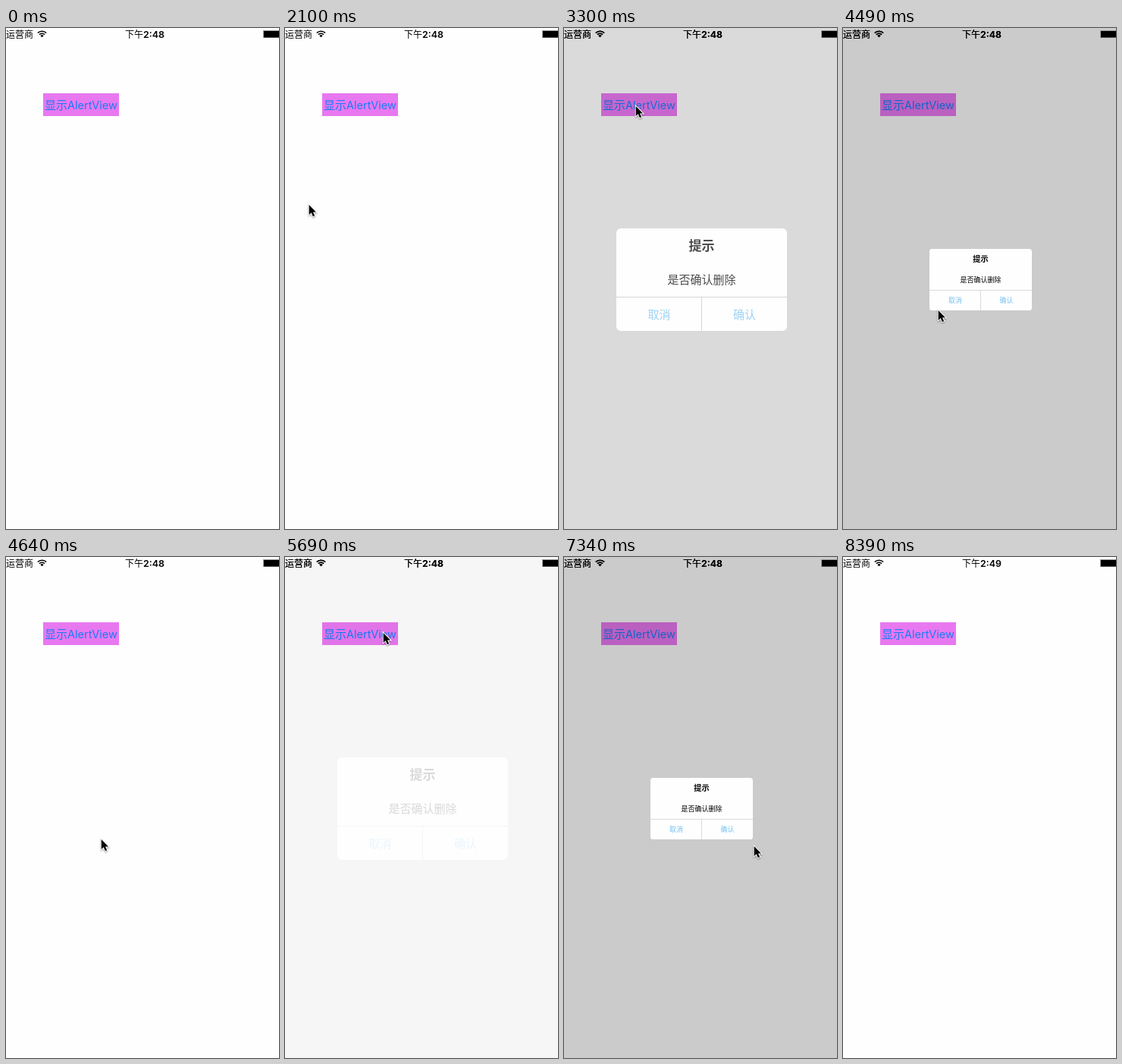
An HTML page with a canvas for the animation above (9.04 s loop, 360 by 660 pixels).

```html
<!DOCTYPE html>
<html lang="zh-CN">
<head>
<meta charset="utf-8">
<style>
html, body { margin: 0; width: 100%; height: 100%; overflow: hidden; background: #fefefe; }
canvas { display: block; width: 360px; height: 660px; }
</style>
</head>
<body>
<canvas id="stage"></canvas>
<script>
const W = 360, H = 660, LOOP = 9040, STEP = 150;
const CJK = '"Noto Sans CJK SC", "Noto Sans CJK", sans-serif';
const LATIN = 'Inter, sans-serif';
const canvas = document.getElementById('stage');
const c = canvas.getContext('2d');
const dpr = window.devicePixelRatio || 1;
canvas.width = W * dpr;
canvas.height = H * dpr;

const clamp = v => Math.max(0, Math.min(1, v));
const ease = v => { v = clamp(v); return v * v * (3 - 2 * v); };

// Pointer stops: time, x, y, sideways bend on the way there
const stops = [
  [2100, 31, 232], [2550, 89, 107], [2700, 89, 107], [2850, 94, 102],
  [3300, 94, 102], [4040, 125, 371], [4790, 125, 371], [5390, 129, 99, -7],
  [5840, 129, 99], [6590, 242, 393], [6890, 250, 380], [7640, 250, 380],
  [8240, 345, 645], [8390, 345, 645]
];

// Each showing: fade-in start, shrink start, removal
const alerts = [
  { open: 3108, shrink: 4250, end: 4640 },
  { open: 5617, shrink: 7100, end: 7490 }
];

function snap(t) {
  const shift = t < 3440 ? 0 : 10;
  return Math.floor((t + shift) / STEP) * STEP - shift;
}

function text(str, x, y, size, color, { font = CJK, weight = 400, align = 'left' } = {}) {
  c.font = `${weight} ${size}px ${font}`;
  c.textAlign = align;
  c.fillStyle = color;
  c.fillText(str, x, y);
}

function rect(x, y, w, h, color) {
  c.fillStyle = color;
  c.fillRect(x, y, w, h);
}

function roundRect(x, y, w, h, r) {
  c.beginPath();
  c.moveTo(x + r, y);
  c.arcTo(x + w, y, x + w, y + h, r);
  c.arcTo(x + w, y + h, x, y + h, r);
  c.arcTo(x, y + h, x, y, r);
  c.arcTo(x, y, x + w, y, r);
  c.closePath();
}

function wifi(x, y) {
  const from = -Math.PI * 0.75, to = -Math.PI * 0.25;
  c.strokeStyle = c.fillStyle = '#000';
  c.lineWidth = 1.6;
  for (const r of [8, 5]) {
    c.beginPath();
    c.arc(x, y, r, from, to);
    c.stroke();
  }
  c.beginPath();
  c.moveTo(x, y);
  c.arc(x, y, 2.9, from, to);
  c.fill();
}

function statusBar(t) {
  text('运营商', 0, 12.6, 12, '#000');
  wifi(47.5, 12.2);
  text('下午', 157, 12.6, 12, '#000', { weight: 500 });
  text(t < 8240 ? '2:48' : '2:49', 181, 12.6, 12.4, '#000', { font: LATIN, weight: 600 });
  rect(339, 3, 21, 10, '#999');
  rect(340, 4, 20, 8.5, '#000');
}

function button() {
  rect(49, 86, 100, 30, '#e878f0');
  text('显示', 51, 106.6, 15, '#1a7cf8');
  text('AlertView', 81, 106.6, 14.5, '#1a7cf8', { font: LATIN });
}

function dialog(alpha, scale) {
  const center = { align: 'center' };
  c.save();
  c.translate(181.5, 331.5);
  c.scale(scale, scale);
  c.translate(-181.5, -331.5);
  roundRect(69, 264, 225, 135, 6);
  c.fillStyle = '#fefefe';
  c.fill();
  c.globalAlpha = alpha;
  text('提示', 181.5, 292.5, 17, '#000', { align: 'center', weight: 600 });
  text('是否确认删除', 181.5, 337, 15, '#000', center);
  rect(69, 354, 225, 1, '#c4c4c4');
  rect(181, 354, 1, 45, '#c4c4c4');
  text('取消', 125.5, 383, 15, '#74c0f2', center);
  text('确认', 238, 383, 15, '#74c0f2', center);
  c.restore();
}

function alertView(t) {
  const a = alerts.find(v => t > v.open && t < v.end);
  if (!a) return;
  const alpha = ease((t - a.open) / 300);
  rect(0, 0, W, H, `rgba(0,0,0,${0.2 * alpha})`);
  statusBar(t);
  dialog(alpha, 1 - 0.4 * ease((t - a.shrink) / 240));
}

function pointer(t) {
  const i = stops.findIndex(s => s[0] > t);
  if (i < 1) return;
  const [t0, x0, y0] = stops[i - 1];
  const [t1, x1, y1, bend = 0] = stops[i];
  const p = ease((t - t0) / (t1 - t0));
  c.save();
  c.translate(x0 + (x1 - x0) * p + bend * Math.sin(Math.PI * p) + 0.7,
              y0 + (y1 - y0) * p + 0.9);
  const shape = new Path2D('M0 0V13L3 10.4L5.2 15.3L7.5 14.3L5.3 9.5H9.3Z');
  c.shadowColor = 'rgba(0,0,0,.4)';
  c.shadowBlur = 2 * dpr;
  c.shadowOffsetY = dpr;
  c.lineWidth = 2;
  c.strokeStyle = '#fff';
  c.stroke(shape);
  c.shadowColor = 'transparent';
  c.fillStyle = '#000';
  c.fill(shape);
  c.restore();
}

function draw(t) {
  c.setTransform(dpr, 0, 0, dpr, 0, 0);
  rect(0, 0, W, H, '#fefefe');
  button();
  statusBar(t);
  alertView(t);
  pointer(t);
}

const start = performance.now();
function tick() {
  draw(snap((performance.now() - start) % LOOP));
  requestAnimationFrame(tick);
}
tick();
</script>
</body>
</html>
```
